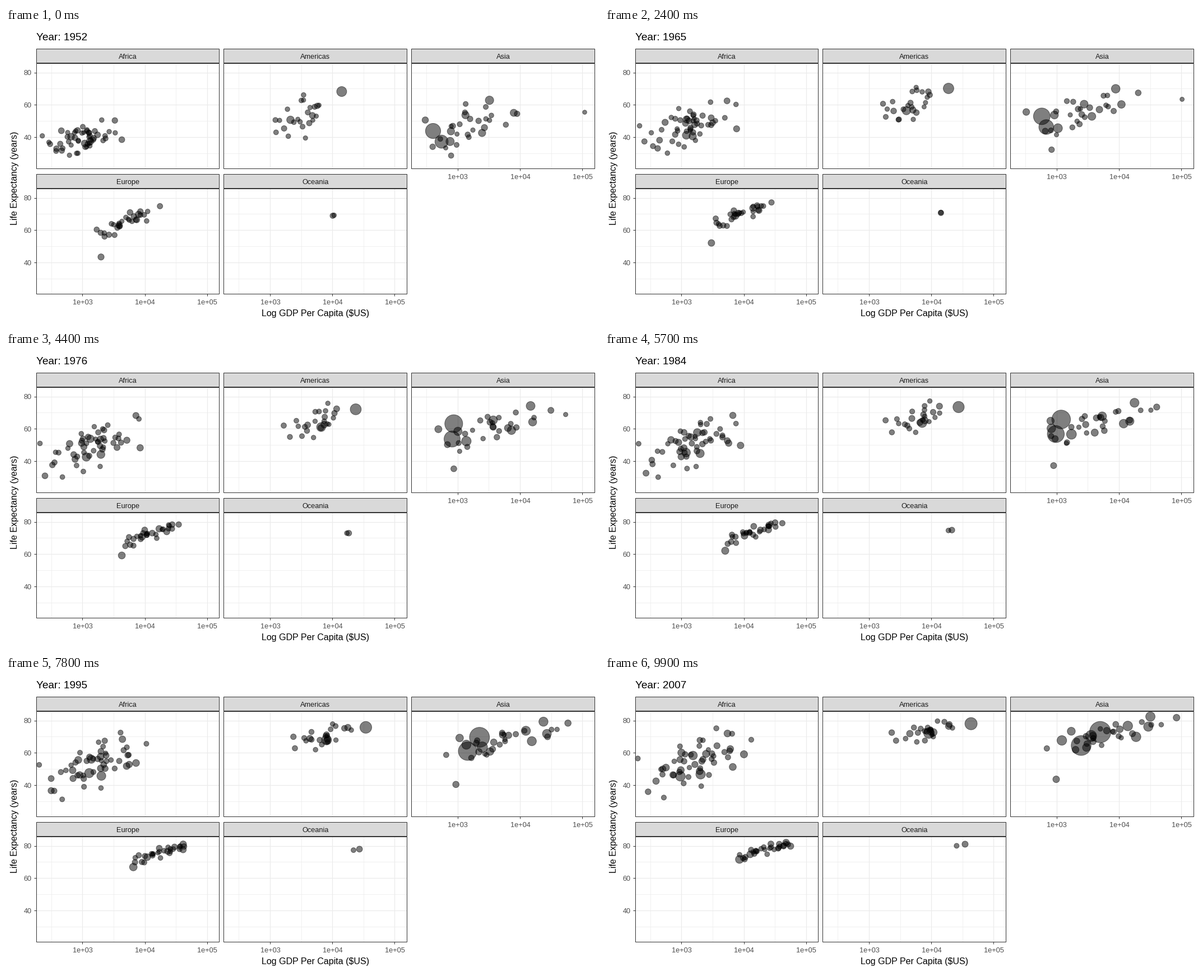
A matplotlib script for the animation above (10000 ms loop, 1058 by 529 pixels).

```python
import numpy as np
import matplotlib.pyplot as plt
from matplotlib.animation import FuncAnimation
from matplotlib.patches import Rectangle

W, H, DPI = 1058, 529, 100
PX = 72 / DPI  # one pixel in points
FRAMES, INTERVAL = 100, 100
SURVEYS = np.arange(1952, 2008, 5)
YEARS = np.linspace(1952, 2007, FRAMES)
COL_STEP, ROW_STEP = 334.7, 224
GRID, DARK = "#ebebeb", "#333333"

plt.rcParams["font.family"] = "Liberation Sans"
fig = plt.figure(figsize=(W / DPI, H / DPI), dpi=DPI, facecolor="white")
ax = fig.add_axes([0, 0, 1, 1])
ax.set(xlim=(0, W), ylim=(H, 0))
ax.axis("off")
rng = np.random.default_rng(7)


# Scales
def gdp_x(log_gdp):
    return 136.8 + (log_gdp - 3) * 111.2


def life_y(life):
    return 64 + (85.55 - life) * 2.889


def dot_area(pop_start, pop_end):
    sizes = [2 + 10 * np.sqrt(pop / 1318.7) for pop in (pop_start, pop_end)]
    diameter = 3.08 * np.interp(YEARS, (1952, 2007), sizes) + 1.02
    return (diameter * PX) ** 2


# Static parts
def label(x, y, text, px, color="black", ha="center", **kw):
    return ax.text(x, y, text, fontsize=px * PX, color=color, ha=ha,
                   va="baseline", **kw)


def pixel(v):
    """Centre of the pixel that holds v, so thin lines stay crisp."""
    return np.floor(v) + 0.5


def line(x, y, color, width, z):
    ax.plot(pixel(np.array(x)), pixel(np.array(y)), color=color,
            lw=width * PX, zorder=z, solid_capstyle="butt", snap=False)


def box(x, y, w, h, z, fill="none"):
    ax.add_patch(Rectangle((x, y), w, h, fc=fill, ec=DARK, lw=PX, zorder=z,
                           snap=False))


def panel(name, col, row, x_axis=False, y_axis=False):
    """Draw one facet and return its offset in pixels."""
    dx, dy = COL_STEP * col, ROW_STEP * row
    left, top = pixel(54 + dx), 63.5 + dy
    right, bottom = pixel(380.6 + dx), top + 188

    for step in range(6):
        major = step % 2
        width = 1.2 if major else 0.7
        x = gdp_x(2.5 + step / 2) + dx
        y = life_y(30 + 10 * step) + dy
        line([x, x], [top, bottom], GRID, width, 1 + major)
        line([left, right], [y, y], GRID, width, 1 + major)
        if major and x_axis:
            line([x, x], [bottom, bottom + 4], DARK, 1, 3)
            label(x, bottom + 18, f"1e+0{3 + step // 2}", 12.7, "#4d4d4d")
        if major and y_axis:
            line([left - 4, left], [y, y], DARK, 1, 3)
            label(46, y + 4.2, str(30 + 10 * step), 12.7, "#4d4d4d", "right")

    box(left, top - 26, right - left, 25, 6, "#d9d9d9")
    box(left, top, right - left, 188, 6)
    label((left + right) / 2, top - 8.8, name, 12.7, "#1a1a1a", zorder=7)
    return dx, dy


# Bubbles
tracks = []


def add_track(offset, years, log_gdp, life, pops):
    dx, dy = offset
    tracks.append((gdp_x(np.interp(YEARS, years, log_gdp)) + dx,
                   life_y(np.interp(YEARS, years, life)) + dy,
                   dot_area(*pops)))


def bubble(offset, pops, *points):
    """A single country through a few (year, gdp, life) points."""
    years, gdp, life = np.array(points).T
    add_track(offset, years, np.log10(gdp), life, pops)


def drift(n, keep=0.98):
    """Slowly wandering normal scores: one row per survey, unit spread."""
    rows = [rng.standard_normal(n)]
    for _ in SURVEYS[1:]:
        rows.append(keep * rows[-1]
                    + np.sqrt(1 - keep ** 2) * rng.standard_normal(n))
    z = np.array(rows)
    z -= z.mean(axis=1, keepdims=True)
    return np.clip(z / z.std(axis=1, keepdims=True), -2.2, 2.2)


def cloud(offset, n, gdp, gdp_sd, life, life_sd, corr, ease, pop, growth):
    """n countries around a centre that moves from start to end values."""
    t = np.linspace(0, 1, len(SURVEYS))[:, None] ** ease

    def blend(pair):
        return pair[0] + (pair[1] - pair[0]) * t

    zx, zy = drift(n), drift(n)
    r = blend(corr)
    log_gdp = blend(gdp) + blend(gdp_sd) * zx
    years_of_life = blend(life) + blend(life_sd) * (
        r * zx + np.sqrt(1 - r ** 2) * zy)
    years_of_life = np.clip(years_of_life, 29, 82.2)
    pops = np.clip(rng.lognormal(np.log(pop), 1.1, n), 0.1, 50)
    for k in range(n):
        add_track(offset, SURVEYS, log_gdp[:, k], years_of_life[:, k],
                  (pops[k], pops[k] * growth))


africa = panel("Africa", 0, 0, y_axis=True)
cloud(africa, 51, (2.99, 3.22), (0.29, 0.42), (39.2, 55), (5, 9),
      (0.3, 0.55), 0.5, 3.5, 2.9)
bubble(africa, (33, 135), (1952, 1077, 36.3), (1976, 1960, 44.3),
       (2007, 2014, 46.9))

americas = panel("Americas", 1, 0)
cloud(americas, 23, (3.49, 3.91), (0.21, 0.25), (52.8, 73.4), (8.5, 4),
      (0.6, 0.7), 0.7, 3.5, 2.7)
bubble(americas, (157.6, 301), (1952, 13990, 68.4), (1970, 20700, 71),
       (2007, 42952, 78.2))
bubble(americas, (56.6, 190), (1952, 2109, 50.9), (1976, 6500, 61.1),
       (2007, 9066, 72.4))

asia = panel("Asia", 2, 0, x_axis=True)
cloud(asia, 27, (3.19, 3.82), (0.36, 0.5), (47.5, 71.5), (8, 5.5),
      (0.6, 0.8), 0.75, 7, 2.8)
bubble(asia, (556, 1318.7), (1952, 400, 44), (1961, 510, 45.7),
       (1970, 650, 61), (1990, 1540, 68.3), (2007, 4959, 73))
bubble(asia, (372, 1110), (1952, 547, 37.4), (1976, 800, 53.7),
       (1990, 1120, 59.6), (2007, 2452, 64.7))
bubble(asia, (82, 223.5), (1952, 750, 37.5), (1976, 1350, 52.3),
       (2007, 3541, 70.6))
bubble(asia, (86.5, 127.5), (1952, 3217, 63), (1970, 12500, 72.6),
       (2007, 31656, 82.6))
bubble(asia, (0.16, 2.5), (1952, 108382, 55.6), (1970, 100000, 66.4),
       (1982, 31354, 71.3), (2007, 47307, 77.6))
bubble(asia, (8.4, 31.9), (1952, 779, 28.8), (2007, 975, 43.8))

europe = panel("Europe", 0, 1, x_axis=True, y_axis=True)
cloud(europe, 29, (3.69, 4.36), (0.25, 0.24), (65.2, 77.9), (4.8, 2.6),
      (0.88, 0.85), 0.65, 7.5, 1.2)
bubble(europe, (22.2, 71.2), (1952, 1969, 43.6), (1976, 4200, 59.2),
       (2007, 8458, 71.8))

oceania = panel("Oceania", 1, 1, x_axis=True)
bubble(oceania, (8.7, 20.4), (1952, 10040, 69.1), (1970, 15900, 71.5),
       (2007, 34435, 81.2))
bubble(oceania, (2, 4.1), (1952, 10557, 69.4), (1970, 15600, 71.7),
       (2007, 25185, 80.2))

label(552, 514.5, "Log GDP Per Capita ($US)", 16)
label(20, 268, "Life Expectancy (years)", 16, rotation=90,
      rotation_mode="anchor")
title = label(53.5, 22.5, "", 19, ha="left")

xs, ys, areas = np.array(tracks).transpose(1, 0, 2)
dots = ax.scatter(xs[:, 0], ys[:, 0], s=areas[:, 0], color="black", alpha=0.5,
                  linewidths=PX, zorder=5)


def update(i):
    dots.set_offsets(np.column_stack((xs[:, i], ys[:, i])))
    dots.set_sizes(areas[:, i])
    title.set_text(f"Year: {round(YEARS[i])}")
    return dots, title


anim = FuncAnimation(fig, update, frames=FRAMES, interval=INTERVAL,
                     init_func=lambda: update(0), repeat=True)
plt.show()
```
